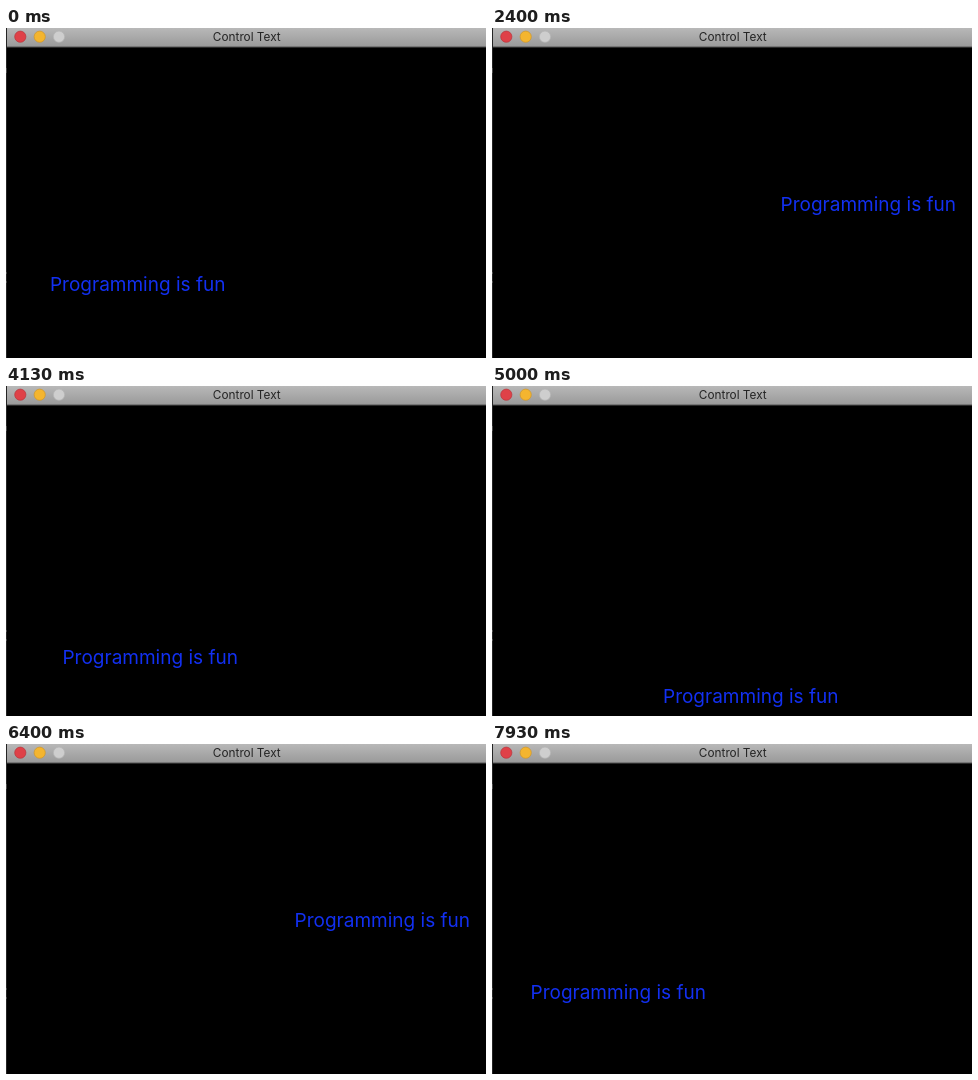
An HTML page for the animation above (8000 ms loop, 480x330 px).

```html
<!DOCTYPE html>
<html lang="en">
<head>
<meta charset="utf-8">
<title>Control Text</title>
<style>
  html, body { margin: 0; width: 100%; height: 100%; overflow: hidden; background: #000; }
  svg { display: block; width: 480px; height: 330px; }
  text { font-family: Inter, "Open Sans", sans-serif; text-anchor: middle; }
</style>
</head>
<body>
<svg viewBox="0 0 480 330">
  <defs>
    <linearGradient id="bar" x2="0" y2="1">
      <stop stop-color="#b8b8b8"/>
      <stop offset="1" stop-color="#999"/>
    </linearGradient>
  </defs>
  <rect width="480" height="330"/>
  <rect width="1" height="330" fill="#242424"/>
  <path d="M0 40v5M0 244v2M0 253v2" stroke="#555" stroke-width="1.5"/>
  <rect x="1" width="479" height="19" fill="url(#bar)"/>
  <rect x="1" y="18.5" width="479" height="1" fill="#555"/>
  <g stroke-width=".7">
    <circle cx="14.3" cy="8.7" r="5.6" fill="#df4148" stroke="#b8343b"/>
    <circle cx="33.7" cy="8.7" r="5.6" fill="#f4b52f" stroke="#cd952b"/>
    <circle cx="53" cy="8.7" r="5.6" fill="#cecece" stroke="#b5b5b5"/>
  </g>
  <text x="240.8" y="13.4" font-size="11.8" fill="#242424">Control Text</text>
  <text id="message" font-size="19" fill="#1230f2">Programming is fun</text>
</svg>
<script>
  const message = document.getElementById("message");
  const FPS = 15, PERIOD = 4, START_OFFSET = 1.124;
  const START_ANGLE = 172, SWEEP = 196;

  // Accelerates over the first fifth, brakes over the last fifth.
  function easeBoth(t) {
    if (t < 0.2) return 3.125 * t * t;
    if (t > 0.8) return 1 - 3.125 * (1 - t) ** 2;
    return 1.25 * t - 0.125;
  }

  function draw(now) {
    const seconds = Math.floor(now * FPS / 1000 + 0.06) / FPS;
    const phase = (seconds + START_OFFSET) % PERIOD / PERIOD;
    const angle = (START_ANGLE + SWEEP * easeBoth(phase)) * Math.PI / 180;
    const x = 240.8 + 135.5 * Math.cos(angle);
    const y = 181.5 - 137 * Math.sin(angle);
    message.setAttribute("transform", `translate(${x.toFixed(2)} ${y.toFixed(2)})`);
  }

  const begin = performance.now();
  function tick() {
    draw(performance.now() - begin);
    requestAnimationFrame(tick);
  }
  tick();
</script>
</body>
</html>
```
